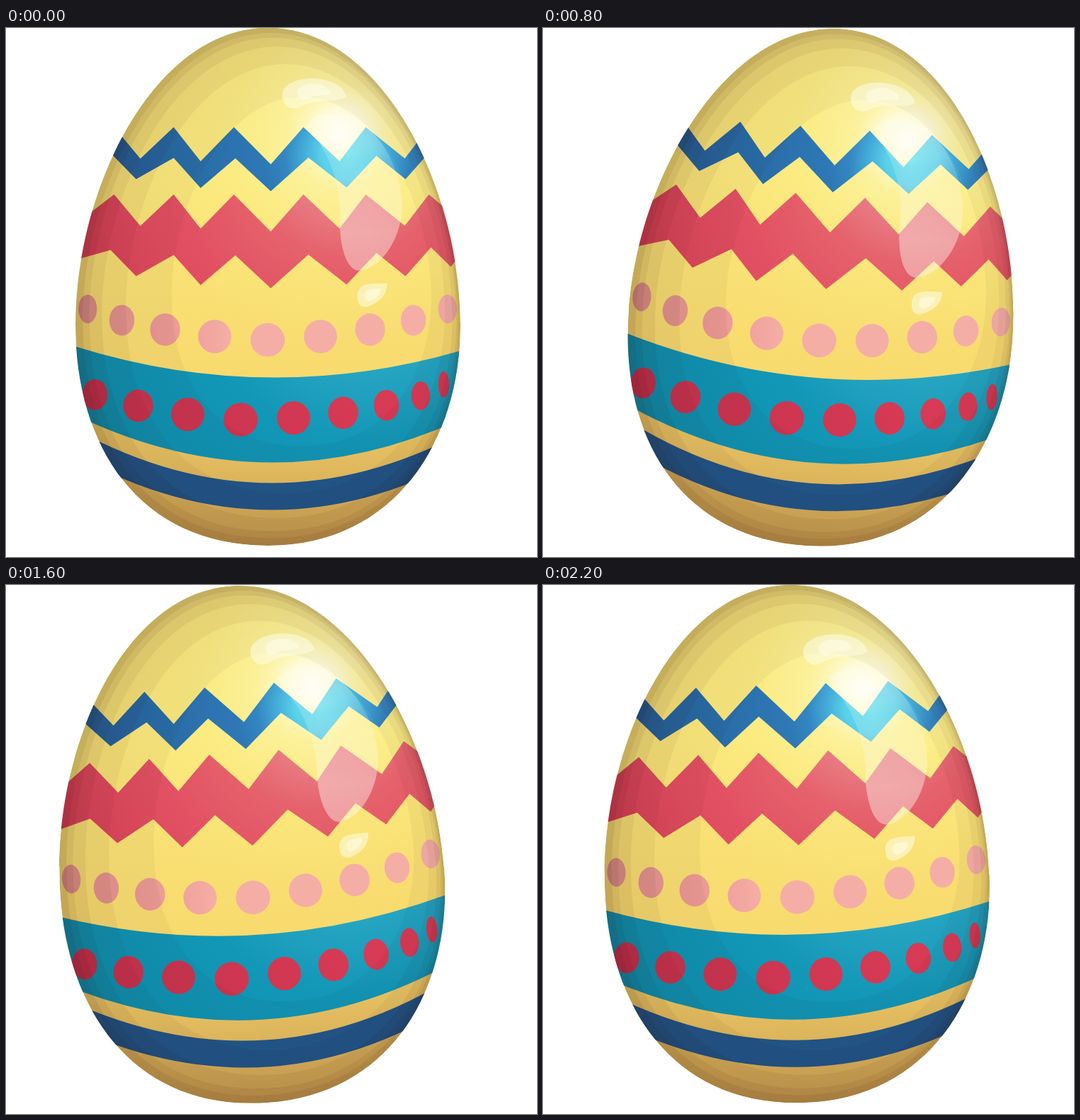
An HTML page with a canvas for the animation above (2400 ms loop, 749x747 px).

```html
<!DOCTYPE html>
<html lang="en">
<head>
<meta charset="utf-8">
<title>Rocking egg</title>
<style>
  html, body { margin: 0; width: 100%; height: 100%; overflow: hidden; background: #fff; }
  canvas { display: block; }
</style>
</head>
<body>
<canvas id="stage" width="749" height="747"></canvas>
<script>
const ctx = document.getElementById('stage').getContext('2d');
const MID = 370;
const PIVOT_Y = 736;

const egg = new Path2D(
  'M370 0C530 0 641.5 225 641.5 420C641.5 582 550 731.5 370 731.5' +
  'C187 731.5 98.5 590 98.5 420C98.5 225 210 0 370 0Z');

// Zigzag edges: valleys and peaks alternate along x and bend up toward the sides
const topXs = [100, 153, 190, 237, 275, 322, 374, 420, 471, 508, 563, 597, 645];
const bottomXs = [90, 148, 184, 237, 275, 324, 374, 427, 481, 523, 564, 600, 628, 660];
const bend = x => (x - 374) / 185;
const topPoint = (x, i) => [x, i % 2 ? 140.5 : 193 - 8 * Math.abs(bend(x))];
const bottomPoint = (x, i) => [x, i % 2 ? 184 - 4 * bend(x) ** 4 - 1.5 * bend(x) : 231 - 16 * bend(x) ** 2];

function zigzag(topShift, bottomShift) {
  const path = new Path2D();
  topXs.map(topPoint).forEach(([x, y]) => path.lineTo(x, y + topShift));
  bottomXs.map(bottomPoint).reverse().forEach(([x, y]) => path.lineTo(x, y + bottomShift));
  path.closePath();
  return path;
}

// Stripe between two sagging curves, each given by its middle height and sag
function stripe(topY, topSag, bottomY, bottomSag) {
  const reach = 1.1, w = 272 * reach, tilt = 3 * reach;
  const rise = sag => sag * reach * reach;
  const top = rise(topSag), bottom = rise(bottomSag);
  return new Path2D(
    `M${MID - w} ${topY - top - tilt}Q${MID} ${topY + top} ${MID + w} ${topY - top + tilt}` +
    `L${MID + w} ${bottomY - bottom + tilt}Q${MID} ${bottomY + bottom} ${MID - w} ${bottomY - bottom - tilt}Z`);
}

// Row of dots spread evenly around the shell, seen from the front
function dotRow(cx, cy, first, last, tilt) {
  const path = new Path2D();
  for (let k = first; k <= last; k++) {
    const angle = k * 14.3 * Math.PI / 180;
    const x = cx + 302 * Math.sin(angle);
    const y = cy - 4.9 * Math.abs(k) ** 1.58 + tilt * k;
    const rx = 24.2 * Math.cos(angle), ry = 23.8 - .22 * k * k;
    path.moveTo(x + rx, y);
    path.ellipse(x, y, rx, ry, 0, 0, 7);
  }
  return path;
}

function scaled(path, s, x, y) {
  const copy = new Path2D();
  copy.addPath(path, new DOMMatrix([s, 0, 0, s, x * (1 - s), y * (1 - s)]));
  return copy;
}

const blueZigzag = zigzag(0, 0);
const redZigzag = zigzag(95, 137);
const pinkDots = dotRow(369.5, 441, -4, 4, 0);
const redDots = dotRow(331.5, 553.5, -3, 5, 2.5);
const tealBand = stripe(494, 41, 614, 64);
const navyBand = stripe(643, 73, 681, 74);

const longGloss = new Path2D(
  'M426 138C430 118 480 112 512 143C545 172 562 225 559 260' +
  'C555 305 525 343 497 343C478 340 470 300 472 270C473 215 455 178 426 138Z');
const topGloss = new Path2D('M390 97C388 65 470 62 481 97C468 108 440 98 415 112C400 118 391 108 390 97Z');
const lowGloss = new Path2D('M496 378C497 360 515 361 538 361C538 380 525 388 511 394C498 396 496 388 496 378Z');
const topGlint = scaled(topGloss, .52, 435, 87);
const lowGlint = scaled(lowGloss, .52, 518, 377);

function withStops(gradient, stops) {
  for (const [at, color] of stops) gradient.addColorStop(at, color);
  return gradient;
}
const radial = (x, y, r, ...stops) => withStops(ctx.createRadialGradient(x, y, 0, x, y, r), stops);
const linear = (x0, y0, x1, y1, ...stops) => withStops(ctx.createLinearGradient(x0, y0, x1, y1), stops);

const paint = {
  shell: linear(0, 0, 0, 731, [0, '#f6e279'], [.3, '#fae67a'], [.68, '#f8da6e'], [.83, '#ebc464'], [1, '#cfa454']),
  glow: radial(473, 150, 300, [0, 'rgba(255,255,255,.97)'], [.12, 'rgba(255,255,232,.85)'],
    [.25, 'rgba(255,253,190,.5)'], [.55, 'rgba(255,250,150,.24)'], [1, 'rgba(255,245,140,0)']),
  blue: radial(482, 178, 330, [0, '#6fe2f1'], [.11, '#5ad0e9'], [.18, '#46aeda'], [.27, '#3386c1'],
    [.36, '#2e78b5'], [1, '#245f97']),
  red: radial(480, 185, 400, [.1, '#eb8a90'], [.35, '#e5626c'], [.6, '#e25163'], [1, '#d84157']),
  pink: linear(100, 0, 320, 0, [0, '#dd8f88'], [.6, '#eb9a94'], [1, '#f5aea6']),
  teal: radial(510, 350, 420, [.26, '#2ba8c4'], [.57, '#1297b7'], [1, '#0f8fae']),
  dots: radial(540, 500, 400, [0, '#d93b55'], [1, '#c4324d']),
  gloss: linear(0, 120, 0, 290, [0, 'rgba(255,253,240,.4)'], [.4, 'rgba(255,253,240,.15)'], [1, 'rgba(255,250,240,.42)'])
};

function fill(path, style) {
  ctx.fillStyle = style;
  ctx.fill(path);
}

// Darken the rim in steps: each ring lies outside an egg shrunk toward the light
function shadeRims() {
  for (let i = 0; i < 5; i++) {
    const ring = scaled(egg, 1 - .025 * 1.9 ** i, 515, 300);
    ring.addPath(egg);
    ctx.fillStyle = `rgba(45,14,12,${.07 - .008 * i})`;
    ctx.fill(ring, 'evenodd');
  }
}

function drawEgg() {
  ctx.clip(egg);
  fill(egg, paint.shell);
  fill(egg, paint.glow);
  fill(blueZigzag, paint.blue);
  fill(redZigzag, paint.red);
  fill(pinkDots, paint.pink);
  fill(tealBand, paint.teal);
  fill(redDots, paint.dots);
  fill(navyBand, '#21568a');
  shadeRims();
  fill(longGloss, paint.gloss);
  for (const path of [topGloss, lowGloss, topGlint, lowGlint]) fill(path, 'rgba(255,255,238,.52)');
}

// Rock by two degrees per step, six degrees to each side
function draw(now) {
  const step = Math.floor(now / 200) % 12;
  const degrees = 2 * (3 - Math.abs((step + 3) % 12 - 6));
  ctx.fillStyle = '#fff';
  ctx.fillRect(0, 0, 749, 747);
  ctx.save();
  ctx.translate(MID - .5, PIVOT_Y - .5);
  ctx.rotate(degrees * Math.PI / 180);
  ctx.translate(-MID, -PIVOT_Y);
  drawEgg();
  ctx.restore();
}

const start = performance.now();
function frame() {
  draw(performance.now() - start);
  requestAnimationFrame(frame);
}
frame();
</script>
</body>
</html>
```
